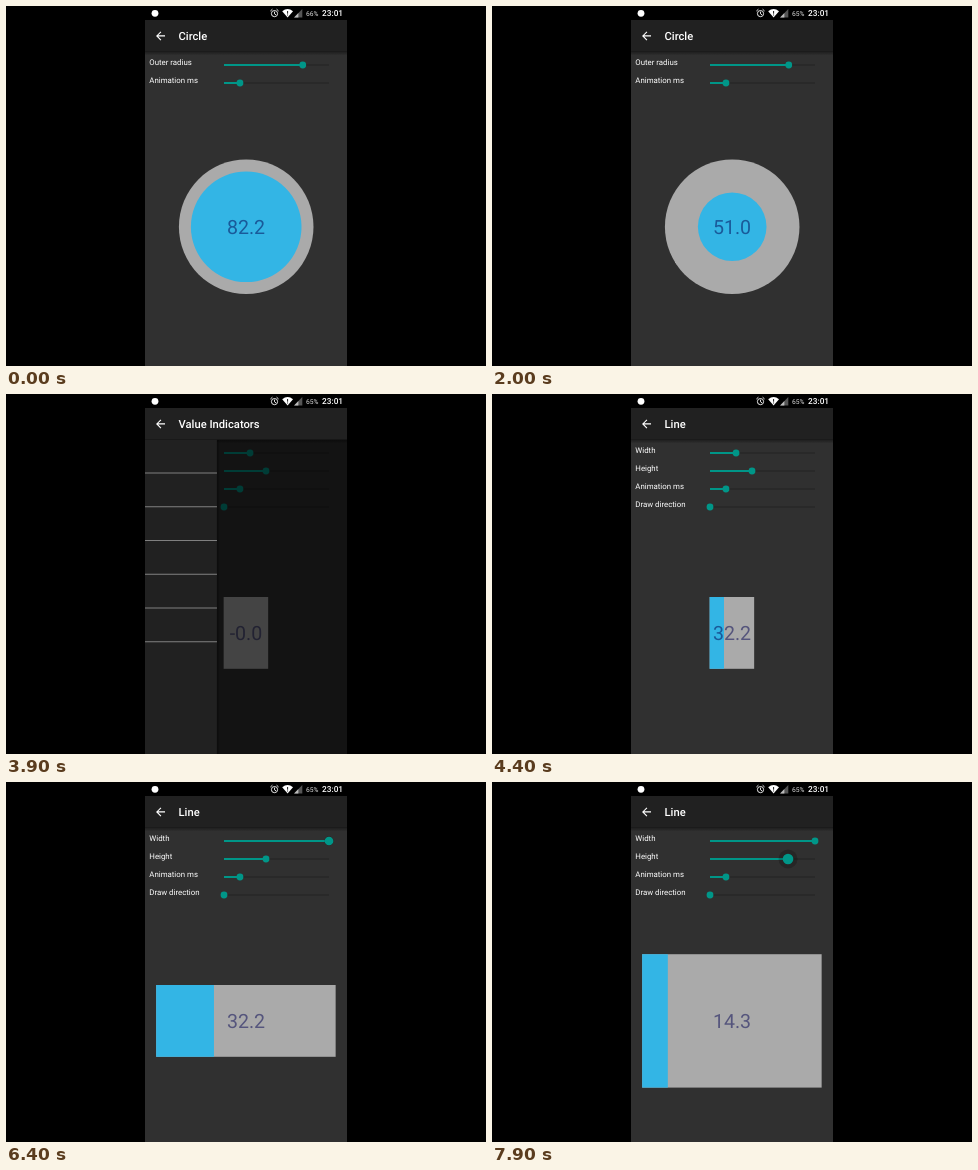
Write an HTML page that moves like this. It is 480 px wide and 360 px high and loops after 8 s.

```html
<!DOCTYPE html>
<html lang="en">
<head>
<meta charset="utf-8">
<title>Value indicators</title>
<style>
  html, body { margin: 0; width: 100%; height: 100%; overflow: hidden; background: #000; }
  svg { display: block; width: 480px; height: 360px; }
  text { font-family: Roboto, "Noto Sans", sans-serif; fill: #fff; text-rendering: geometricPrecision; }
  .label { font-size: 7.85px; }
  .title { font-size: 11.2px; font-weight: 500; }
  .item { font-size: 9px; }
  .value { font-size: 19.6px; text-anchor: middle; fill: #000050; fill-opacity: .5; }
  .rail { stroke: #222; stroke-width: 1; }
  .active { stroke: #009688; stroke-width: 2; }
  .thumb { fill: #009688; }
  .halo { fill: #000; fill-opacity: .2; }
  .track { fill: #aaa; }
  .fill { fill: #33b5e5; }
</style>
</head>
<body>
<svg viewBox="0 0 480 360">
  <defs>
    <clipPath id="screen"><rect x="139" y="45.5" width="202" height="315"/></clipPath>
    <clipPath id="toolbar"><rect x="139" y="14" width="202" height="31.5"/></clipPath>
    <linearGradient id="shadeDown" x2="0" y2="1">
      <stop offset="0" stop-opacity=".4"/><stop offset="1" stop-opacity="0"/>
    </linearGradient>
    <linearGradient id="shadeRight">
      <stop offset="0" stop-opacity=".4"/><stop offset="1" stop-opacity="0"/>
    </linearGradient>
  </defs>
  <rect width="480" height="360"/>

  <g clip-path="url(#screen)">
    <rect x="139" y="45" width="202" height="315" fill="#303030"/>
    <g id="circlePage">
      <circle class="track" cx="240.2" cy="220.8" r="67.3"/>
      <circle class="fill" id="disc" cx="240.2" cy="220.8"/>
      <text class="value" id="circleValue" x="240" y="227.6"></text>
    </g>
    <g id="linePage">
      <rect class="track" id="bar"/>
      <rect class="fill" id="barFill"/>
      <text class="value" id="lineValue" x="240" y="245.7"></text>
    </g>
    <rect id="scrim" x="139" y="45" width="202" height="315"/>
    <rect x="139" y="45.5" width="202" height="4" fill="url(#shadeDown)"/>
    <g id="drawer">
      <rect y="45.5" width="135" height="315" fill="#212121"/>
      <rect x="135" y="45.5" width="3" height="315" fill="url(#shadeRight)"/>
    </g>
  </g>

  <g clip-path="url(#toolbar)">
    <rect x="139" y="14" width="202" height="32" fill="#212121"/>
    <circle id="ripple" cx="154.5" cy="30" r="23" fill="#363636"/>
  </g>
  <path transform="translate(147.8 23.2) scale(.561)" fill="#fff"
    d="M20 11H7.83l5.59-5.59L12 4l-8 8 8 8 1.41-1.41L7.83 13H20z"/>
  <text class="title" id="title" x="172.5" y="34"></text>

  <!-- status bar -->
  <circle cx="149" cy="7.3" r="3.4" fill="#fff"/>
  <g fill="none" stroke="#fff" stroke-width=".9">
    <circle cx="268.5" cy="7.6" r="3.1"/>
    <path d="M268.5 5.6v2.2l1.5 1M264.4 5l2-1.8M272.6 5l-2-1.8"/>
  </g>
  <path d="M276.2 5.2Q281.6 1 287 5.2L281.6 11.6z" fill="#fff"/>
  <path d="M281.6 5v2.7M281.6 8.5v1" stroke="#000" stroke-width=".9"/>
  <path d="M296.3 3v8.4h-8.2z" fill="#555"/>
  <path d="M292.4 7v4.4h-4.3z" fill="#bbb"/>
  <text id="battery" x="300" y="9.7" style="font-size:6.7px;fill:#ddd"></text>
  <text x="316" y="10.2" style="font-size:8.3px;font-weight:500">23:01</text>
</svg>
<script>
const $ = id => document.getElementById(id);
const LOOP = 8000, STEP = 100;
const RAIL_X = 218, RAIL_LEN = 105, FULL = 179.5, DRAWER = 135;

function add(parent, tag, attrs, text = '') {
  const el = document.createElementNS('http://www.w3.org/2000/svg', tag);
  set(el, attrs);
  el.textContent = text;
  parent.append(el);
  return el;
}

function set(el, attrs) {
  for (const key in attrs) el.setAttribute(key, attrs[key]);
}

function slider(page, row, name) {
  const y = 59 + row * 18;
  add(page, 'text', { class: 'label', x: 143.3, y: y - .2 }, name);
  add(page, 'path', { class: 'rail', d: `M${RAIL_X} ${y}h${RAIL_LEN}` });
  const active = add(page, 'path', { class: 'active' });
  const halo = add(page, 'circle', { class: 'halo', cy: y });
  const thumb = add(page, 'circle', { class: 'thumb', cy: y });
  return (part, press = 0) => {
    const x = RAIL_X + part * RAIL_LEN;
    set(active, { d: `M${RAIL_X} ${y}H${x}` });
    set(halo, { cx: x, r: 9.5 * press });
    set(thumb, { cx: x, r: 3.4 + 1.9 * press });
  };
}

const smooth = k => (1 - Math.cos(Math.PI * k)) / 2;
const linear = k => k;

// Interpolates between [time, value] keys.
function tween(t, keys, ease = linear) {
  const i = keys.findIndex(key => key[0] > t);
  if (i === 0) return keys[0][1];
  if (i < 0) return keys[keys.length - 1][1];
  const [t0, a] = keys[i - 1], [t1, b] = keys[i];
  return a + (b - a) * ease((t - t0) / (t1 - t0));
}

const show = (id, on) => set($(id), { display: on ? 'inline' : 'none' });

slider($('circlePage'), 0, 'Outer radius')(.75);
slider($('circlePage'), 1, 'Animation ms')(.152);
const widthSlider = slider($('linePage'), 0, 'Width');
const heightSlider = slider($('linePage'), 1, 'Height');
slider($('linePage'), 2, 'Animation ms')(.152);
slider($('linePage'), 3, 'Draw direction')(0);

['Line', 'Circle', 'Half circle', 'Arc', 'Circular line', 'About'].forEach((name, i) => {
  const y = 79 + i * 33.75;
  add($('drawer'), 'text', { class: 'item', x: 9, y: y - 13.5 }, name);
  add($('drawer'), 'path', { d: `M0 ${y}h${DRAWER}`, stroke: '#8c8c8c', 'stroke-width': .9 });
});

const circleKeys = [[0, 82.2], [500, 51], [2000, 51], [2500, 71.4]];
const lineKeys = [[3900, -.01], [4400, 32.2], [6400, 32.2], [6900, 14.3]];
const widthKeys = [[5200, .248], [5800, .6], [6300, 1]];
const heightKeys = [[7200, .4], [7700, .68], [7800, .725], [7900, .743]];
const openKeys = [[2600, 0], [2700, .433], [2800, .82], [2900, .96], [3000, 1],
  [3800, 1], [3900, .533], [4000, .18], [4100, .04], [4200, 0]];
const dimKeys = [[2600, 0], [2700, .24], [2800, .48], [2900, .57], [3000, .6],
  [3900, .6], [4000, .2], [4100, .04], [4200, 0]];
const rippleKeys = [[2500, 0], [2600, .9], [2700, 1], [2900, .5], [3200, 0]];
const widthPress = [[5100, 0], [5300, 1], [6300, 1], [6500, 0]];
const heightPress = [[7100, 0], [7300, 1]];

function draw(t) {
  const onLine = t >= 3800;
  show('circlePage', !onLine);
  show('linePage', onLine);
  $('title').textContent = t < 3000 ? 'Circle' : t < 4200 ? 'Value Indicators' : 'Line';
  $('battery').textContent = t < 700 ? '66%' : '65%';

  const round = tween(t, circleKeys, smooth);
  set($('disc'), { r: 67.3 * round / 100 });
  $('circleValue').textContent = round.toFixed(1);

  const level = tween(t, lineKeys, smooth);
  const wide = tween(t, widthKeys), high = tween(t, heightKeys);
  const w = FULL * wide, h = FULL * high;
  const box = { x: 239.9 - w / 2, y: 238.9 - h / 2, height: h };
  set($('bar'), { ...box, width: w });
  set($('barFill'), { ...box, width: Math.max(0, w * level / 100) });
  $('lineValue').textContent = level.toFixed(1);
  widthSlider(wide, tween(t, widthPress));
  heightSlider(high, tween(t, heightPress));

  const open = tween(t, openKeys);
  show('drawer', open > 0);
  set($('drawer'), { transform: `translate(${139 + DRAWER * (open - 1)} 0)` });
  set($('scrim'), { opacity: tween(t, dimKeys) });
  set($('ripple'), { opacity: tween(t, rippleKeys) });
}

const start = performance.now();
function frame() {
  const t = (performance.now() - start) % LOOP;
  draw(Math.floor(t / STEP) * STEP);
  requestAnimationFrame(frame);
}
frame();
</script>
</body>
</html>
```
